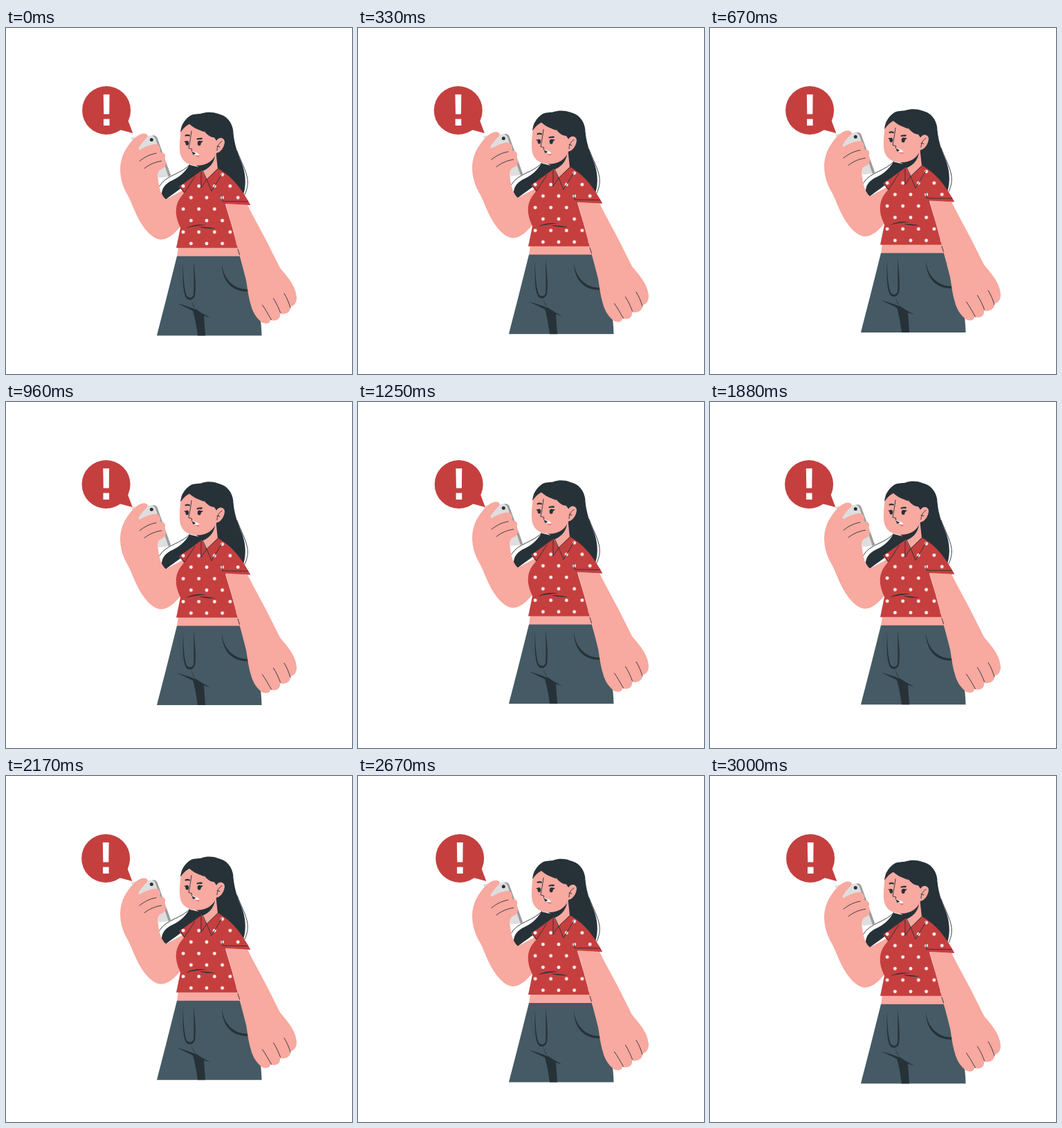
These frames come from a looping animation (500x500 px, 3040 ms). An HTML page:

```html
<!DOCTYPE html>
<html lang="en">
<head>
<meta charset="utf-8">
<title>Alert on the phone</title>
<style>
  html, body { margin: 0; width: 100%; height: 100%; overflow: hidden; background: #fff; }
  svg { display: block; width: 100vw; height: 100vh; }
  .skin { fill: #f8a9a0; }
  .dark { fill: #263238; }
  .red { fill: #c53f3f; }
  .line { fill: none; stroke: #263238; stroke-width: .9; stroke-linecap: round; stroke-linejoin: round; }
</style>
</head>
<body>
<svg viewBox="0 0 500 500">
  <defs>
    <pattern id="dots" x="244.8" y="220.4" width="22.6" height="33.2" patternUnits="userSpaceOnUse">
      <g fill="#fff"><circle cx="11.3" cy="8.3" r="2.4"/><circle cx="0" cy="24.9" r="2.4"/><circle cx="22.6" cy="24.9" r="2.4"/></g>
    </pattern>
    <path id="top" d="M283 206L258 224L250 229L257 239C248 249 245 257 246 270C247 278 250 284 252 289L246 318H335L326 285L317 255L353 256C347 244 338 230 327 219C320 212 313 207 306 203L290 219Z"/>
  </defs>

  <g id="person">
    <!-- back hair -->
    <path class="dark" d="M300 130C320 128 327 140 328.500 152C330 169 335 182 340 194C346 208 348 226 343 241L300 212L303 180Z"/>
    <path class="line" d="M334 178C339 192 347 205 349 219C350 228 348 234 345 241"/>
    <path class="dark" d="M265 198L286 203L284 208C270 221 249 234 231 248C228 247 225 243 225 239C226 232 229 227 237 222C250 216 258 210 265 198Z"/>
    <path class="line" d="M267 196C254 212 231 212 221.500 229"/>

    <!-- raised arm -->
    <path class="skin" d="M219 203C219 223 222 240 231 248L257 234L262 270L253 286C244 297 234 306 224 306C211 305 200 291 192 277C186 266 182 254 177 244C169 231 165 218 165 203C166 186 172 174 185 164L205 180Z"/>
    <path d="M181 160Q181 158 184 158L213 155.500Q217 155.500 218.500 159L238 213Q238 215 236 215L222 216.500Q220 216.500 219 213Z" fill="#dedede"/>
    <path d="M213 155.500Q217 155.500 218.500 159L238 213Q238 215 236 215L234.800 215L216 160Q214.500 157 211 155.700Z" fill="#9c9c9c"/>
    <circle class="dark" cx="210.300" cy="161.800" r="2.500"/>
    <path class="skin" d="M169 184C175 170 185 158 194 154C200 151 207 154 204 158C200 163 194 168 190 177L194 176C202 171 211 168 218 168C223 170 224 176 222 180C229 179 232 184 229 190C233 193 231 200 227 203C223 205 220 205 219 213L176 218Z"/>
    <path class="line" d="M193 192.500C200 187 207 183 217 181.200M200 203C207 197.500 215 194 224.500 192.500" stroke-width="1.200"/>

    <!-- neck and face -->
    <path class="skin" d="M303 176L306 204L290 220L283 206Z"/>
    <path class="dark" d="M270 196L303 179C302 193 296 202 284 207L278 201Z"/>
    <path class="skin" d="M254 140C251 158 250 174 252 183C255 194 265 199 276 199C290 199 300 192 304 181C311 180 316 171 316 164C315 158 308 157 304 163L302 140L264 132Z"/>
    <path class="line" d="M312 164C308 166 305 171 305 177M305 171L309 172"/>
    <path class="dark" d="M252 151C253 141 258 132 267 126.500C274 123.500 280 125 283 123.500C290 121 300 121.500 306 124C319 127 327 136 328.500 150L317 165C315 158 307 156 304 163L301 158.500C297 158 294 157 291.500 154.500C288 152 286.500 149 285 145.500C286 147.500 286.500 149 287 150.500C279 148 270 144 265 139C259 142 256 146 252 151Z"/>
    <g class="dark">
      <ellipse cx="261.800" cy="166.500" rx="2.300" ry="3.400"/>
      <ellipse cx="279.200" cy="166.700" rx="2.500" ry="3.500"/>
      <path d="M257 164L262 163.500L261 167ZM279 163L285 164L281 167Z"/>
      <path d="M258.500 155Q262 153 266 155L265.500 157Q262 155.500 259 157ZM275.500 160Q279 158.500 284 159L283 161.500Q279 160.500 276 162Z"/>
    </g>
    <path class="line" d="M268 149C267 159 265 167 264 174L268.500 175V178"/>
    <path d="M269 178C273 180 278 180 279.500 184C277 186 271 184 269 178Z" fill="#fff"/>
    <path class="dark" d="M268.500 178.500L274.500 181.500L270.500 183.500Z"/>
    <path d="M273 183.500Q277 185 279.500 184Q279.500 187 277 187Q274.500 186 273 183.500Z" fill="#e27c85"/>

    <!-- trousers and waist -->
    <path class="skin" d="M249 316H335L339 331H247Z"/>
    <path d="M247 330H338L350 370L367 416Q369 428 369.500 444.600H218C224 421 231 394 236 374Z" fill="#455a64"/>
    <path class="line" d="M251 344Q250 365 256 383" stroke-dasharray="2 3" opacity=".3"/>
    <path class="dark" d="M256 339C256 357 257 376 261 387C264 391 269 391 271 386C272 372 271 355 271 338C273 355 275 374 273 387C270 395 262 395 259 388C255 376 255 357 256 339Z"/>
    <path class="dark" d="M312 341C314 362 328 378 350 378V381C326 382 312 365 312 341Z"/>
    <path class="dark" d="M247 398C258 401 267 404 274 407L267 393L271 403C276 409 285 413 295 419L286 416L288 444.600H277C275 430 273 419 270 409Z"/>

    <!-- shirt -->
    <use href="#top" class="red"/>
    <use href="#top" fill="url(#dots)"/>
    <path class="line" d="M251 228L258 238L273 215M282 208V231L290 219L297 236L312 211M284 206L290 219L306 204"/>
    <path class="dark" d="M260 289.500C269 284.500 279 283.500 290 285C279 285.500 269 287 260 289.500ZM279 287.500C287 287.500 295 288.500 303 290C294 290.500 286 290 279 287.500Z"/>

    <!-- hanging arm -->
    <path class="skin" d="M317 253L349 256C359 276 371 297 380 315C386 327 391 337 396 347C405 358 419 372 420 390C420 398 416 402 411 403C412 411 403 415 396 413C397 421 390 425 382 422C382 428 374 428 370 426C362 420 356 410 354 401C350 388 349 376 347 365L338 330C331 304 325 279 317 253Z"/>
    <path class="red" d="M313 248L349 248.500L353 256L314 254Z"/>
    <path class="line" d="M312 242L313 250.500L349 251M335 320L337.500 328"/>
    <path class="line" d="M370.500 400.500C375 407 379 414 383.500 422M386.500 391C391 398 394 405 396.500 411.500M402 384C406 390 409 398 411 404.500"/>
  </g>

  <g id="bubble">
    <circle class="red" cx="145.300" cy="119" r="35"/>
    <path class="red" d="M163 146.500L183.500 152L176 132Z"/>
    <path d="M141 96H149.800L149.500 124.500H141.500ZM141.200 131.500H149.800V141H141.200Z" fill="#fff"/>
  </g>
</svg>
<script>
  const LOOP = 3040, FPS = 24, LEAD = 0.03;
  const FLOAT_PERIOD = 3, FLOAT_HEIGHT = 10;
  const SHAKE_PERIOD = 1.5, SHAKE = [0, -1, 2, -4, 4, -4, 4, -4, 2, -1, 0];
  const person = document.getElementById('person');
  const bubble = document.getElementById('bubble');

  const phase = (seconds, period) => (seconds / period) % 1;

  function shakeAt(p) {
    const x = p * (SHAKE.length - 1), i = Math.floor(x);
    return SHAKE[i] + (SHAKE[i + 1] - SHAKE[i]) * (x - i);
  }

  function draw(ms) {
    // The motion is stepped at a film-like rate.
    const seconds = Math.floor((ms % LOOP + 5) * FPS / 1000) / FPS + LEAD;
    const lift = 1 - Math.abs(2 * phase(seconds, FLOAT_PERIOD) - 1);
    person.setAttribute('transform', `translate(0 ${-FLOAT_HEIGHT * lift})`);
    bubble.setAttribute('transform', `translate(${shakeAt(phase(seconds, SHAKE_PERIOD))} 0)`);
  }

  const start = performance.now();
  function tick() {
    draw(performance.now() - start);
    requestAnimationFrame(tick);
  }
  tick();
</script>
</body>
</html>
```
